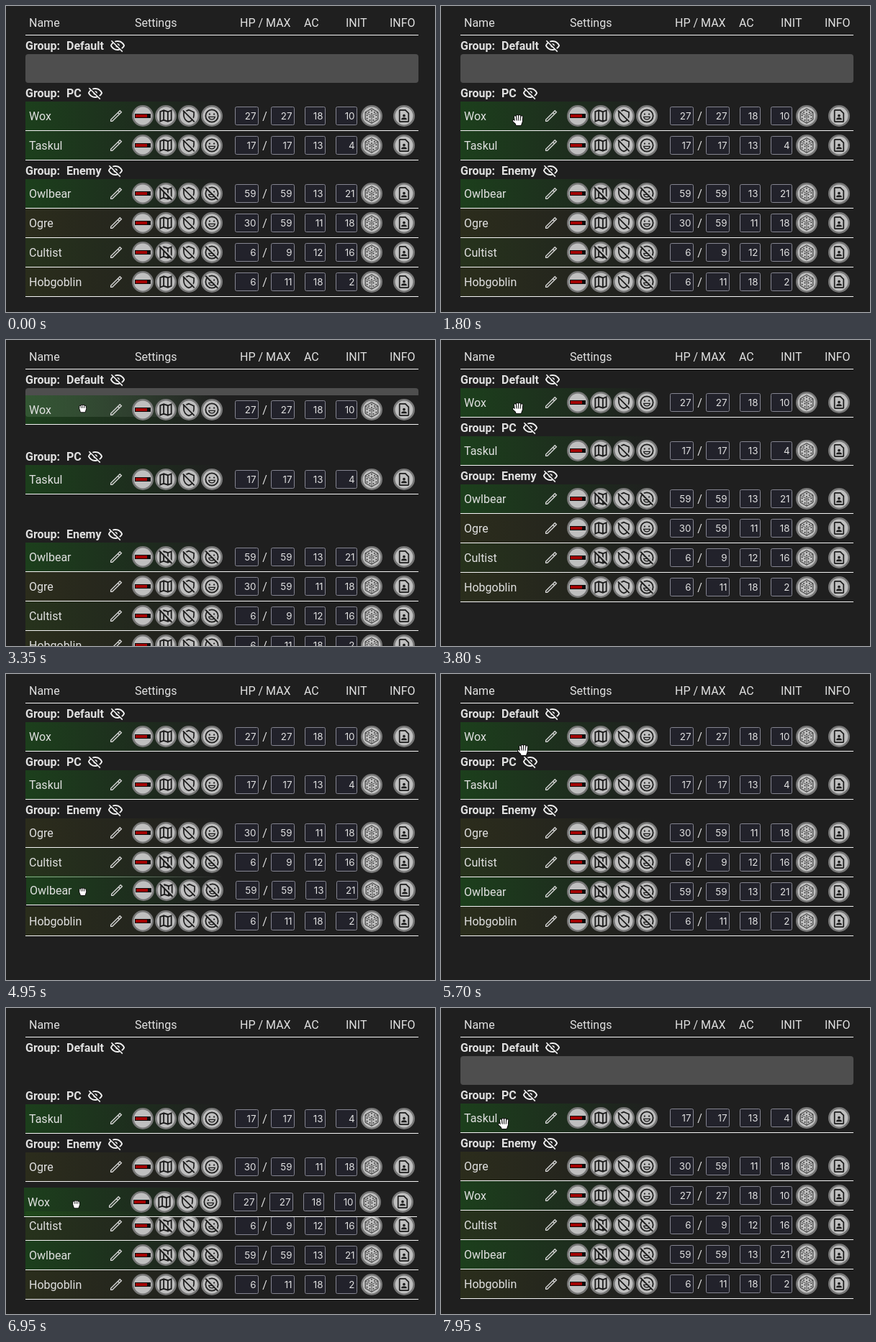
Recreate the animation shown at these times as an HTML page with a canvas. Size 596 by 426 pixels, loop 8000 ms.

```html
<!DOCTYPE html>
<html lang="en">
<head>
<meta charset="utf-8">
<title>Initiative tracker</title>
<style>
html, body { margin: 0; width: 100%; height: 100%; overflow: hidden; background: #1f1f1f; }
canvas { display: block; }
</style>
</head>
<body>
<canvas id="stage" width="596" height="426"></canvas>
<script>
const ctx = document.getElementById('stage').getContext('2d');
const LOOP = 8000, SETTLE = 140, LEFT = 27, WIDTH = 546;
const INK = '#1c1c1c', FACE = '#bfbfbf';
const BODY = '16px Roboto, sans-serif', BOLD = 'bold 16px Roboto, sans-serif';
const DIGITS = '13.33px Inter, sans-serif';

const rows = {
  W: { name: 'Wox', hp: 27, max: 27, ac: 18, init: 10 },
  T: { name: 'Taskul', hp: 17, max: 17, ac: 13, init: 4 },
  B: { name: 'Owlbear', hp: 59, max: 59, ac: 13, init: 21, mapOff: true, faceOff: true },
  O: { name: 'Ogre', hp: 30, max: 59, ac: 11, init: 18 },
  C: { name: 'Cultist', hp: 6, max: 9, ac: 12, init: 16, mapOff: true, faceOff: true },
  H: { name: 'Hobgoblin', hp: 6, max: 11, ac: 18, init: 2, faceOff: true }
};
const groups = ['Default', 'PC', 'Enemy'];

// Row order over time: | parts the groups, # is the empty-group panel, _ a free slot.
const steps = [
  [0, '#|WT|BOCH'],
  [2300, 'W#|T_|BOCH'],
  [3620, 'W|T|BOCH'],
  [4580, 'W|T|OBCH'],
  [4800, 'W|T|OCBH'],
  [6400, '_|WT|OCBH'],
  [6600, '_|T|WOCBH'],
  [6740, '_|T|OWCBH'],
  [7350, '#|T|OWCBH']
].map(([time, order]) => ({ time, order, spots: layout(order) }));

const drags = [
  { key: 'W', from: 1900, drop: 3480 },
  { key: 'B', from: 4300, drop: 5000 },
  { key: 'W', from: 5920, drop: 7200 }
];

// Pointer stops: time, x, y.
const path = [
  [150, 612, 92], [1150, 108, 300], [1800, 107, 159], [1900, 106, 150], [2700, 107, 96],
  [3480, 106, 94], [3800, 107, 95], [4300, 105, 222], [5000, 106, 303], [5700, 114, 106],
  [5920, 99, 89], [6950, 97, 272], [7200, 98, 265], [7950, 87, 161]
];

const icons = {
  eyeOff: new Path2D('M2,5.27L3.28,4L20,20.72L18.73,22L15.65,18.92C14.5,19.3 13.28,19.5 12,19.5C7,19.5 2.73,16.39 1,12C1.69,10.24 2.79,8.69 4.19,7.46L2,5.27M12,9A3,3 0 0,1 15,12C15,12.35 14.94,12.69 14.83,13L11,9.17C11.31,9.06 11.65,9 12,9M12,4.5C17,4.5 21.27,7.61 23,12C22.18,14.08 20.79,15.88 19,17.19L17.58,15.76C18.94,14.82 20.06,13.54 20.82,12C19.17,8.64 15.76,6.5 12,6.5C10.91,6.5 9.84,6.68 8.84,7L7.3,5.47C8.74,4.85 10.33,4.5 12,4.5M3.18,12C4.83,15.36 8.24,17.5 12,17.5C12.69,17.5 13.37,17.43 14,17.29L11.72,15C10.29,14.85 9.15,13.71 9,12.28L5.6,8.87C4.61,9.72 3.78,10.78 3.18,12Z'),
  pencil: new Path2D('M4,20V17.7L17.7,4L20,6.3L6.3,20ZM14.6,7.1L16.9,9.4'),
  map: new Path2D('M4,5.8L9,4L15,6L20,4V18.2L15,20L9,18L4,20ZM9,4V18M15,6V20'),
  shield: new Path2D('M12,2.5L4,6V11C4,15.8 7.4,20.3 12,21.5C16.6,20.3 20,15.8 20,11V6Z'),
  page: new Path2D('M14,3H6Q5,3 5,4V20Q5,21 6,21H18Q19,21 19,20V8Z'),
  person: new Path2D('M12,9.5A2.1,2.1 0 1,1 11.99,9.5ZM7.8,17.8V16.8C7.8,13.8 16.2,13.8 16.2,16.8V17.8Z'),
  smile: new Path2D('M7.4,13.4H16.6A4.7,4.7 0 0,1 7.4,13.4Z')
};

const mix = (a, b, k) => a + (b - a) * k;
const clamp = k => Math.max(0, Math.min(1, k));
const easeOut = k => 1 - (1 - clamp(k)) ** 3;
const smooth = k => k * k * (3 - 2 * k);

// Centre line of every group title and row.
function layout(order) {
  const spots = {};
  let y = 55;
  order.split('|').forEach((slots, i) => {
    spots[groups[i]] = y;
    y += 12;
    for (const slot of slots) {
      spots[slot] = y + 20;
      y += slot === '#' ? 40 : 41;
    }
    y += 14;
  });
  return spots;
}

// Rows slide while one is held; letting go changes the order at once.
function spotsAt(t) {
  const i = steps.findLastIndex(s => s.time <= t);
  const { time, spots } = steps[i];
  if (!drags.some(d => time >= d.from && time <= d.drop)) return spots;
  const before = steps[i - 1].spots, now = {};
  for (const key in spots) now[key] = mix(before[key] ?? spots[key], spots[key], easeOut((t - time) / 180));
  return now;
}

function pointer(t) {
  const i = Math.max(1, path.findIndex(p => p[0] > t));
  const end = t >= path.at(-1)[0] ? path.length - 1 : i;
  const a = path[end - 1], b = path[end];
  const k = smooth(clamp((t - a[0]) / (b[0] - a[0])));
  return { x: mix(a[1], b[1], k), y: mix(a[2], b[2], k) };
}

function heldSpot({ key, from, drop }, t, home) {
  const start = pointer(from), now = pointer(Math.min(t, drop));
  const k = easeOut((t - drop) / SETTLE);
  return {
    x: mix(now.x - start.x, 0, k),
    y: mix(spotsAt(from)[key] + now.y - start.y, home, k)
  };
}

function text(str, x, y, font = BODY, align = 'left') {
  ctx.font = font;
  ctx.textAlign = align;
  ctx.fillStyle = '#e0e0e0';
  ctx.fillText(str, x, y);
}

function roundRect(x, y, w, h, r) {
  ctx.beginPath();
  ctx.roundRect(x, y, w, h, r);
}

function rect(x, y, w, h, color) {
  ctx.fillStyle = color;
  ctx.fillRect(x, y, w, h);
}

function line(x1, y1, x2, y2) {
  ctx.beginPath();
  ctx.moveTo(x1, y1);
  ctx.lineTo(x2, y2);
  ctx.stroke();
}

function dot(x, y, r) {
  ctx.beginPath();
  ctx.arc(x, y, r, 0, 7);
  ctx.fill();
}

// Runs a drawing in a 24-unit box centred on x, y.
function icon(x, y, scale, draw, color = INK) {
  ctx.save();
  ctx.translate(x, y);
  ctx.scale(scale, scale);
  ctx.translate(-12, -12);
  ctx.strokeStyle = ctx.fillStyle = color;
  ctx.lineWidth = 1.9;
  draw();
  ctx.restore();
}

function slash() {
  ctx.lineWidth = 2;
  ctx.strokeStyle = FACE;
  line(4.6, 2.4, 22, 19.8);
  ctx.strokeStyle = INK;
  line(2.6, 3.2, 20.8, 21.4);
}

function button(x) {
  ctx.fillStyle = '#777';
  dot(x, 0, 15);
  ctx.fillStyle = FACE;
  dot(x, 0, 12.4);
}

function drawFace(off) {
  ctx.beginPath();
  ctx.arc(12, 12, 9.2, 0, 7);
  ctx.stroke();
  dot(8.7, 9.4, 1.2);
  dot(15.3, 9.4, 1.2);
  ctx.lineWidth = 1.4;
  ctx.stroke(icons.smile);
  if (off) slash();
}

function drawDice() {
  const corner = i => [10.2 * Math.sin(i * Math.PI / 3), -10.2 * Math.cos(i * Math.PI / 3)];
  ctx.translate(12, 12);
  ctx.lineWidth = 1;
  ctx.beginPath();
  for (let i = 0; i < 6; i++) ctx.lineTo(...corner(i));
  ctx.closePath();
  ctx.stroke();
  ctx.lineWidth = .7;
  for (const i of [1, 3, 5]) {
    const a = corner(i), b = corner(i + 2);
    line(0, 0, ...a);
    for (const u of [.28, .72]) {
      for (const v of [.28, .72]) dot(a[0] * u + b[0] * v, a[1] * u + b[1] * v, .9);
    }
  }
}

function field(x, w, value) {
  roundRect(x + .5, -12.5, w - 1, 25, 2);
  ctx.fillStyle = '#22222b';
  ctx.fill();
  ctx.strokeStyle = '#858591';
  ctx.lineWidth = 1;
  ctx.stroke();
  text(value, x + w - 3.5, 5, DIGITS, 'right');
}

function fade(rgb, from, to) {
  const g = ctx.createLinearGradient(LEFT, 0, LEFT + WIDTH / 2, 0);
  g.addColorStop(0, `rgba(${rgb},${from})`);
  g.addColorStop(1, `rgba(${rgb},${to})`);
  return g;
}

function drawRow(row, x, y) {
  const hurt = Math.min(1, 2 * (1 - row.hp / row.max));
  const tint = [mix(25, 57, hurt), mix(95, 57, hurt), 25];
  ctx.save();
  ctx.translate(Math.round(x), Math.round(y));
  rect(LEFT, -20, WIDTH, 40, fade('31,31,31', 0, 1));
  rect(LEFT, -20, WIDTH, 40, fade(tint, .5, 0));
  rect(LEFT, 20, WIDTH, 1, '#f4f4f4');

  text(row.name, 32, 6);
  icon(153, 0, .92, () => {
    ctx.lineWidth = 1.5;
    ctx.stroke(icons.pencil);
  }, '#d6d6d6');

  [190, 222, 254, 286, 508, 553].forEach(button);
  rect(179, -3, 22, 6, '#0c0c0c');
  rect(180, -2, 16, 4, '#a30000');
  icon(222, 0, .96, () => {
    ctx.stroke(icons.map);
    if (row.mapOff) slash();
  });
  icon(254, 0, .88, () => {
    ctx.stroke(icons.shield);
    slash();
  });
  icon(286, 0, .94, () => drawFace(row.faceOff));
  icon(508, 0, 1, drawDice, '#2c2c2c');
  icon(553, 0, .9, () => {
    ctx.stroke(icons.page);
    ctx.fill(icons.person);
  });

  field(318, 33, row.hp);
  text('/', 359.5, 6, BODY, 'center');
  field(368, 33, row.max);
  field(415, 29, row.ac);
  field(458, 30, row.init);
  ctx.restore();
}

function drawGroup(name, y) {
  text('Group:', LEFT, y + 6, BOLD);
  text(name, 84, y + 6, BOLD);
  icon(Math.round(84 + ctx.measureText(name).width + 19), y, .92, () => ctx.fill(icons.eyeOff), '#f2f2f2');
}

function drawHand({ x, y }, closed) {
  const reach = closed ? 3.5 : 6.5, spread = closed ? 2.6 : 3.1;
  ctx.save();
  ctx.translate(x, y);
  if (closed) ctx.scale(.88, .88);
  ctx.lineCap = ctx.lineJoin = 'round';
  const shape = (color, width) => {
    ctx.strokeStyle = ctx.fillStyle = color;
    ctx.lineWidth = width;
    for (let i = -1.5; i < 2; i++) line(i * spread + .6, Math.abs(i) * 1.1 - reach, i * 2.5 + .8, 2);
    line(-reach + .5, 1, -2.5, 4);
    ctx.beginPath();
    ctx.moveTo(-3, 1);
    ctx.lineTo(5, 1);
    ctx.lineTo(3.4, 6);
    ctx.lineTo(-1.8, 6);
    ctx.closePath();
    ctx.fill();
    ctx.stroke();
  };
  shape('#111', 4);
  shape('#fff', 2);
  ctx.lineWidth = .8;
  ctx.strokeStyle = '#222';
  for (let i = -1; i < 2; i++) line(i * spread + .6, 2 - reach, i * 2.5 + .8, .5);
  ctx.restore();
}

function draw(t) {
  const spots = spotsAt(t);
  const drag = drags.find(d => t >= d.from && t < d.drop + SETTLE);
  rect(0, 0, 596, 426, '#1f1f1f');
  const heads = { Name: 32, Settings: 179, 'HP / MAX': 325, AC: 414, INIT: 472, INFO: 533 };
  for (const label in heads) text(label, heads[label], 29);
  rect(LEFT, 40, WIDTH, 1, '#f4f4f4');

  if ('#' in spots) {
    roundRect(LEFT, 67, WIDTH, 40, 4);
    ctx.fillStyle = '#4e4e4e';
    ctx.fill();
  }
  for (const name of groups) drawGroup(name, Math.round(spots[name]));
  for (const key in rows) if (key !== drag?.key) drawRow(rows[key], 0, spots[key]);
  if (drag) {
    const { x, y } = heldSpot(drag, t, spots[drag.key]);
    drawRow(rows[drag.key], x, y);
  }
  if (t > path[0][0]) drawHand(pointer(t), drag && t < drag.drop);
}

function tick() {
  draw(performance.now() % LOOP);
  requestAnimationFrame(tick);
}
tick();
</script>
</body>
</html>
```
